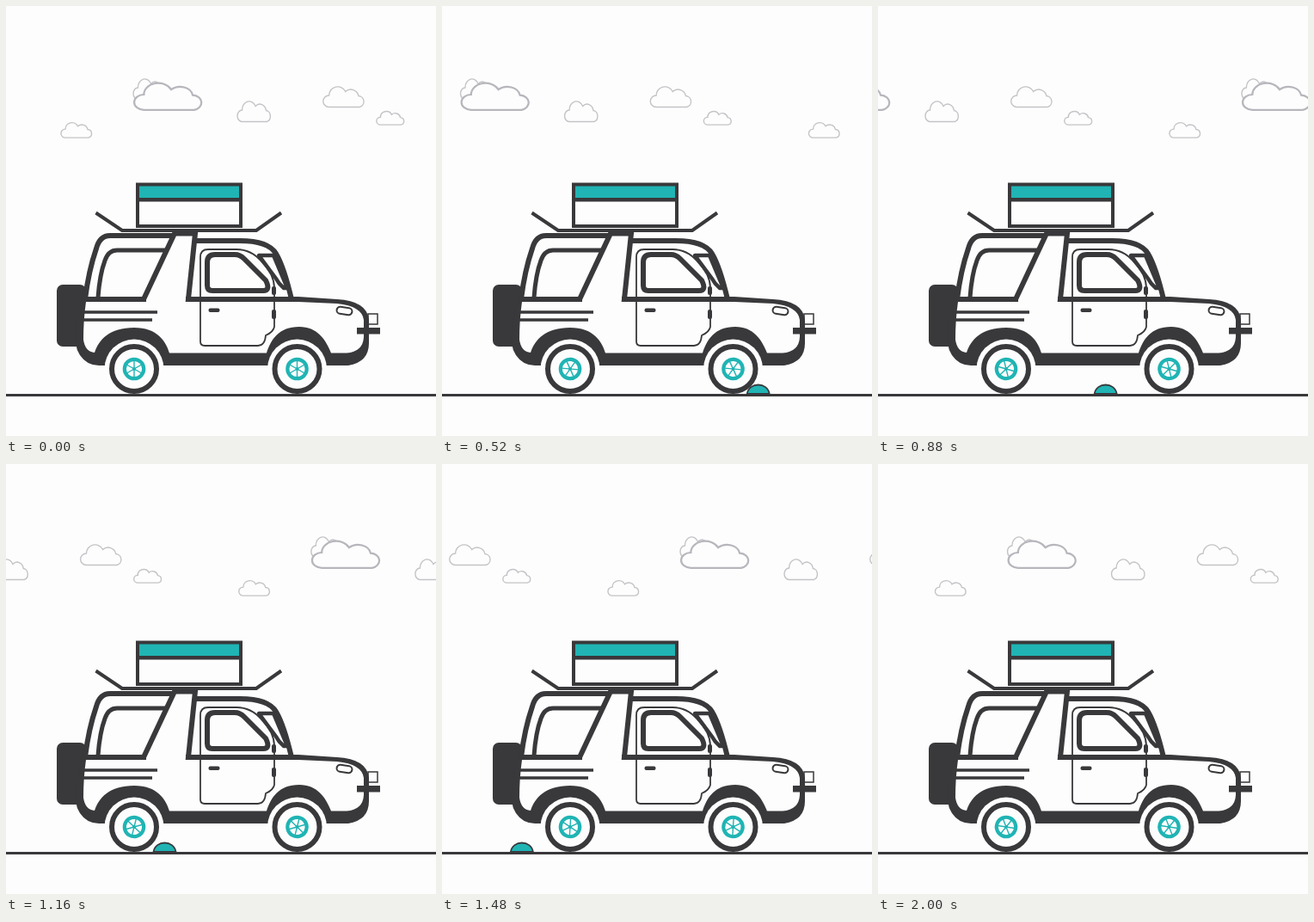
These frames come from a looping animation (500 by 500 pixels, 2.04 s). An HTML page:

```html
<!DOCTYPE html>
<html lang="en">
<head>
<meta charset="utf-8">
<title>Road trip</title>
<style>
  html, body { margin: 0; width: 100%; height: 100%; overflow: hidden; background: #fdfdfd; }
  svg { display: block; width: 100%; height: 100%; }
  .line { fill: none; stroke: #39383b; }
  .paper { fill: #fdfdfd; }
  .dark { fill: #39383b; }
  .teal { fill: #20b4b4; }
  .cloud { fill: #fdfdfd; stroke: #c4c4c8; stroke-width: 1.4; }
  .cloud.big { stroke: #b6b6bc; stroke-width: 2.2; }
</style>
</head>
<body>
<svg viewBox="0 0 500 500">
  <defs>
    <path id="puff" vector-effect="non-scaling-stroke"
      d="M8 24.5A6.6 6.6 0 0 1 8 11A10 10 0 0 1 27 6.500A9 9 0 0 1 42 11.500A6.600 6.600 0 0 1 43 24.5Z"/>
    <circle id="tyre" r="26" class="line" style="fill:#fdfdfd" stroke-width="6"/>
    <g id="hub" fill="none" stroke="#20b4b4">
      <circle r="11.2" stroke-width="4.2"/>
      <path d="M0-10V10M-8.7-5L8.7 5M-8.7 5L8.7-5" stroke-width="1.4"/>
      <circle r="2" class="teal" stroke="none"/>
    </g>
  </defs>

  <g id="sky"></g>

  <g id="box">
    <rect x="153" y="225.5" width="120" height="30.5" class="line" stroke-width="4"/>
  </g>
  <g id="lid">
    <rect x="153" y="207.5" width="120" height="17.5" class="line" style="fill:#20b4b4" stroke-width="4"/>
  </g>

  <g id="body">
    <path class="line" stroke-width="4" d="M104.5 240.5L135 261H291L320 240.5"/>
    <rect class="dark" x="59" y="324" width="34" height="72" rx="7"/>
    <path class="dark" d="M88 338L82 375Q78 394 86 406Q94 418 108 418H398Q422 414 422 392V365Q420 343 385 341L340 338Z"/>
    <path class="paper" d="M93 344Q90 365 90 388Q92 402 103 403C108 388 120 374 149 374C176 374 186 390 190 403.500H303C308 388 317 373 341 373C362 373 372 388 378 403.500H396Q415 402 416 385V365Q414 349 385 346L340 344Z"/>
    <circle class="paper" cx="149" cy="422" r="34.5"/>
    <circle class="paper" cx="338.5" cy="422" r="34.5"/>
    <!-- cabin -->
    <path class="line" stroke-width="6" d="M92 341Q96 308 105 282Q109 267 121 267H195M220 273H272Q305 273 314 288Q323 303 332 341"/>
    <path class="line" stroke-width="5" d="M107 339Q109 312 115 296Q119 284 129 284H188"/>
    <path class="paper" d="M163 335H209V347H163Z"/>
    <path class="line" stroke-width="6" d="M90 341H160L196 264.5H220L212 341H340"/>
    <path class="line" stroke-width="6" stroke-linejoin="round"
      d="M234 325V298Q234 289 243 289H266Q272 289 277 294L302 319Q308 331 299 331H240Q234 331 234 325Z"/>
    <!-- door -->
    <path class="line" stroke-width="1.8"
      d="M226 390V292Q226 283 235 283H268Q285 283 297 297Q312 312 312 328V373Q311 379 302 383Q301 395 293 395H231Q226 395 226 390Z"/>
    <path class="line" style="fill:#fdfdfd" stroke-width="4.5" stroke-linejoin="round" d="M294 290H311L327 328H323Q317 323 314 317Z"/>
    <rect class="dark" x="235.5" y="351.5" width="13" height="4.5" rx="2"/>
    <rect class="dark" x="309" y="326" width="5" height="10" rx="2"/>
    <rect class="dark" x="309" y="353" width="5" height="11" rx="2"/>
    <path class="line" stroke-width="3.5" d="M90 356H176M90 365H170"/>
    <!-- nose -->
    <rect class="line" x="384.5" y="350.5" width="18" height="8" rx="4" stroke-width="2" transform="rotate(8 393.5 354.5)"/>
    <rect class="line" x="421" y="358" width="11" height="12" stroke-width="1.5"/>
    <rect class="dark" x="408" y="374" width="27" height="7.5"/>
  </g>

  <g id="rear"><use href="#tyre"/><use href="#hub" class="spin"/></g>
  <g id="front"><use href="#tyre"/><use href="#hub" class="spin"/></g>

  <path class="line" stroke-width="3" d="M0 452.5H500"/>
  <path id="bump" class="line" style="fill:#20b4b4" stroke-width="1.8" d="M-13 451C-11 437 11 437 13 451Z"/>
</svg>
<script>
const LOOP = 2040, FRAME = 40;
const SKY_WIDTH = 489, SKY_SPEED = 0.24325, ROAD_SPEED = 0.2863;
const $ = id => document.getElementById(id);
const spinners = document.querySelectorAll(".spin");

// x, y, width, height, style
const clouds = [
  [147, 84, 40, 25, ""], [147, 88.5, 83.5, 33, "big"], [63, 135, 38, 18.5, ""],
  [268, 110, 41, 25, ""], [367.5, 93, 50.5, 25, ""], [430, 122, 34, 16.5, ""]
];
const cloudMarkup = dx => clouds.map(([x, y, w, h, kind]) =>
  `<use href="#puff" class="cloud ${kind}" transform="translate(${x + dx} ${y}) scale(${w / 50} ${h / 25})"/>`).join("");
$("sky").innerHTML = cloudMarkup(0) + cloudMarkup(SKY_WIDTH);

const place = (id, value) => $(id).setAttribute("transform", value);
const move = (x, y) => `translate(${x} ${y})`;

function hop(t, start, length) {
  const p = (t - start) / length;
  return p > 0 && p < 1 ? Math.sin(Math.PI * p) : 0;
}

function draw(t) {
  const a = hop(t, 540, 240);   // front wheel over the bump
  const b = hop(t, 1200, 240);  // rear wheel over the bump

  place("sky", move(-SKY_SPEED * t, 0));
  place("bump", move(516.6 - ROAD_SPEED * t, 0));
  place("body", `${move(a, -0.5 * a - 0.7 * b)} rotate(${-0.87 * a} 90 400) rotate(${0.57 * b} 420 400)`);
  place("box", move(-1.6 * a + b, -4.3 * a - 4.7 * b));
  place("lid", `${move(-2 * a + b, -13 * a - 14 * b)} rotate(${-3.8 * a + 3.6 * b} 213 216)`);
  place("rear", move(149 + a - 0.5 * b, 422 - 2 * a - 7.2 * b));
  place("front", move(338.5 + 1.5 * a - 0.7 * b, 422 - 7.2 * a - 2 * b));
  for (const s of spinners) s.setAttribute("transform", `rotate(${1080 * t / LOOP})`);
}

const begin = performance.now();
function tick() {
  const t = (performance.now() - begin) % LOOP;
  draw(Math.floor(t / FRAME) * FRAME);
  requestAnimationFrame(tick);
}
draw(0);
requestAnimationFrame(tick);
</script>
</body>
</html>
```
